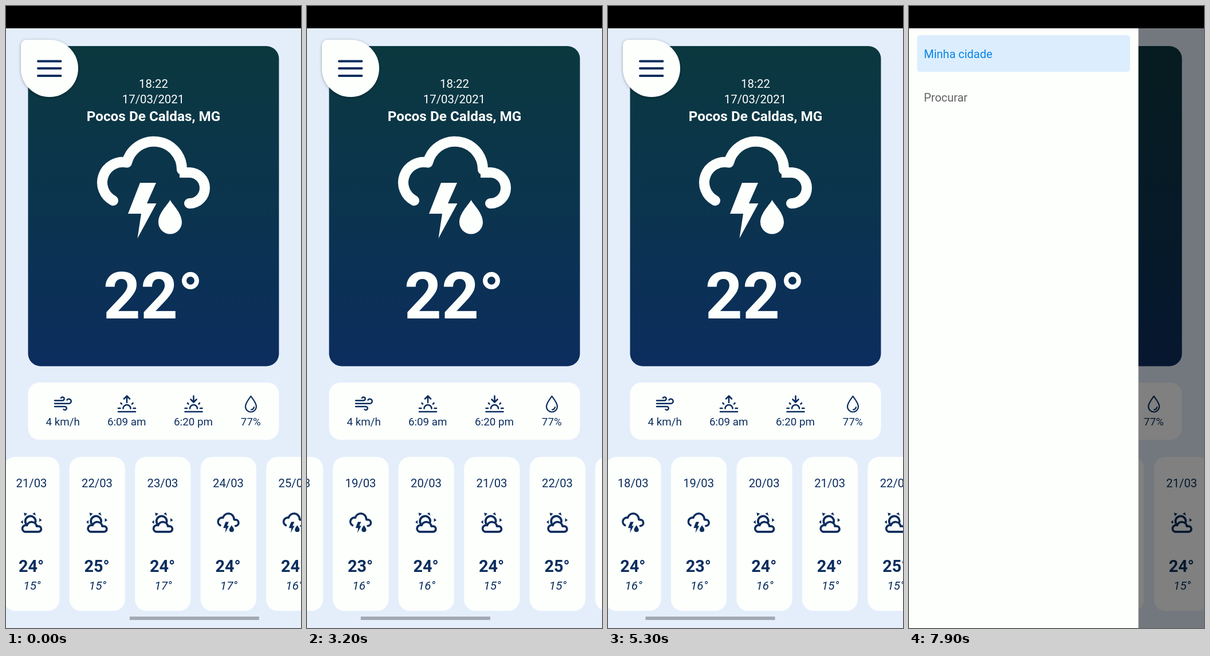
Write an HTML page that moves like this. It is 515 by 1087 pixels and loops after 8 s.

```html
<!DOCTYPE html>
<html lang="pt-BR">
<head>
<meta charset="utf-8">
<title>Previsão do tempo</title>
<style>
  html, body { margin: 0; width: 100%; height: 100%; overflow: hidden; background: #e4eefb; }
  svg { display: block; width: 100vw; height: 100vh; font-family: Roboto, sans-serif; }
  .mid { text-anchor: middle; }
  .line { fill: none; stroke: #0b2d5e; stroke-linecap: round; stroke-linejoin: round; }
  .ink { fill: #0b2d5e; }
  .paper { fill: #fdfffd; }
</style>
</head>
<body>
<svg viewBox="0 0 515 1087">
  <defs>
    <linearGradient id="sky" x2="0" y2="1">
      <stop offset="0" stop-color="#0b383f"/>
      <stop offset=".5" stop-color="#0b344e"/>
      <stop offset="1" stop-color="#0c2d5e"/>
    </linearGradient>
    <filter id="shade" x="-20%" y="-20%" width="140%" height="140%">
      <feDropShadow dx="0" dy="1" stdDeviation="2.5" flood-opacity=".35"/>
    </filter>
    <g id="storm" transform="translate(-257.5 -317)" stroke="none">
      <path d="M187 340A35.7 35.7 0 0 1 211 273.5A48.75 48.75 0 0 1 307 286M320 291A27 27 0 0 1 320 345"
        fill="none" stroke="currentColor" stroke-width="18" stroke-linecap="round" stroke-linejoin="round"/>
      <path fill="currentColor" d="M303 282h20v18h-20zM234 309H262L246 345H262.5L229.5 406L236 363H213z
        M286.5 339C292 349 307 362 307 378A20.5 20.5 0 0 1 266 378C266 362 281 349 286.5 339z"/>
    </g>
    <g id="sun">
      <path class="line" stroke-width="3.7" d="M-12 15.8H12A4.8 4.8 0 0 0 12 6.2H9A8.8 8.8 0 0 0 -8 4.6A5.7 5.7 0 0 0 -12 15.8z
        M-10 1.5A9 9 0 1 1 7 -1.5"/>
      <path class="ink" d="M-13.5 -17.5L-7.5 -16L-12 -11.5zM5.5 -18L7.5 -12.5L1.5 -15.5zM-19 -1L-15 -4.5V2zM18 -4.5L13.5 -8V-1.5z"/>
    </g>
    <path id="dusk" class="line" stroke-width="2.6" d="M-15 709H15M-15 703H-11.5M11.5 703H15M-6.5 703.5A6.5 6.5 0 0 1 6.5 703.5M-10.5 694L-9 695.5M10.5 694L9 695.5"/>
  </defs>

  <rect width="515" height="1087" fill="#e4eefb"/>
  <rect x="38.5" y="70" width="438" height="559.5" rx="22" fill="url(#sky)"/>
  <g class="mid" fill="#fdfffd">
    <text x="257.5" y="142.5" font-size="20.4">18:22</text>
    <text x="257" y="169.5" font-size="20.4">17/03/2021</text>
    <text x="257.5" y="201" font-size="24.3" font-weight="700">Pocos De Caldas, MG</text>
    <text x="257" y="546" font-size="113.5" font-weight="700">22°</text>
  </g>
  <use href="#storm" x="257.5" y="317" color="#fdfffd"/>

  <path class="paper" filter="url(#shade)" d="M36 59H76A50 50 0 1 1 26 109V69A10 10 0 0 1 36 59z"/>
  <path class="line" stroke-width="4" d="M56 96.5H95.5M56 109H95.5M56 122H95.5"/>

  <rect class="paper" x="38.5" y="658" width="438" height="100" rx="20"/>
  <path class="line" stroke-width="2.5" d="M85 689.5H98.5A3 3 0 1 0 96 685M85 694.8H110A4 4 0 1 0 106.5 688.5M85 700H103A3 3 0 1 1 100.5 705"/>
  <use href="#dusk" x="211"/>
  <path class="line" stroke-width="2.6" d="M211 693V682M206 686.5L211 681.5L216 686.5"/>
  <use href="#dusk" x="327.5"/>
  <path class="line" stroke-width="2.6" d="M327.5 681.5V692M322.5 687.5L327.5 692.5L332.5 687.5"/>
  <path class="line" stroke-width="2.2" d="M427.5 682C432 688 437 694 437 700A9.5 9.5 0 0 1 418 700C418 694 423 688 427.5 682zM433 701A5.5 5.5 0 0 1 428 705.5"/>
  <g class="mid ink" font-size="18.8">
    <text x="99.2" y="732.8">4 km/h</text>
    <text x="210.7" y="732.8">6:09 am</text>
    <text x="327" y="732.8">6:20 pm</text>
    <text x="427.3" y="733.3">77%</text>
  </g>

  <g id="days"></g>
  <rect id="thumb" y="1067" width="226" height="6"/>

  <rect id="dim" y="39" width="515" height="1048"/>
  <g id="drawer" font-size="20">
    <rect class="paper" y="39" width="400.5" height="1048"/>
    <rect x="14" y="51" width="372" height="64" rx="5" fill="#dceefd"/>
    <text x="26" y="91" fill="#0a84e8">Minha cidade</text>
    <text x="26" y="167" fill="#636363">Procurar</text>
  </g>
  <rect width="515" height="39"/>
</svg>
<script>
const LOOP = 8000, PITCH = 114.5, DRAWER_W = 400.5;
const $ = id => document.getElementById(id);

// high, low, icon for each day from 17/03
const forecast = [
  [24, 16, 'storm'], [24, 16, 'storm'], [23, 16, 'storm'], [24, 16, 'sun'], [24, 15, 'sun'],
  [25, 15, 'sun'], [24, 17, 'sun'], [24, 17, 'storm'], [24, 16, 'storm'], [24, 16, 'storm']
];

$('days').innerHTML = forecast.map(([high, low, icon], i) => `
  <g class="mid ink" transform="translate(${30.2 + i * PITCH} 0)">
    <rect class="paper" y="788" width="97.2" height="269" rx="20"/>
    <text x="48.3" y="841" font-size="20.3">${17 + i}/03</text>
    <g transform="translate(48.4 903) scale(${icon === 'storm' ? 0.2 : 1})" color="#0b2d5e"><use href="#${icon}"/></g>
    <text x="48" y="989" font-size="28.8" font-weight="700">${high}°</text>
    <text x="49.2" y="1019.7" font-size="20.8" font-style="italic">${low}°</text>
  </g>`).join('');

// swipes: start, end, scroll from, scroll to
const swipes = [
  [50, 700, 492, 186],
  [1150, 1750, 186, 494],
  [2750, 3200, 494, 214],
  [3650, 4150, 214, 456],
  [4850, 6000, 456, 60.5]
];

const clamp = x => Math.min(1, Math.max(0, x));
const easeOut = x => 1 - (1 - x) ** 3;

function spring(ms) {
  const x = Math.max(0, ms) * 0.009;
  return 1 - (1 + x) * Math.exp(-x);
}

function draw(t) {
  const [start, end, from, to] = swipes.findLast(s => t >= s[0]) || swipes[0];
  const scroll = from + (to - from) * easeOut(clamp((t - start) / (end - start)));
  const fade = 1 - clamp((t - end - 300) / 250);
  const open = spring(t - 6061);

  $('days').setAttribute('transform', `translate(${-scroll} 0)`);
  $('thumb').setAttribute('x', scroll * 0.4388);
  $('thumb').setAttribute('opacity', 0.29 * fade);
  $('dim').setAttribute('opacity', 0.5 * open);
  $('drawer').setAttribute('transform', `translate(${(open - 1) * DRAWER_W} 0)`);
}

const began = performance.now();
function tick() {
  draw((performance.now() - began) % LOOP);
  requestAnimationFrame(tick);
}
tick();
</script>
</body>
</html>
```
